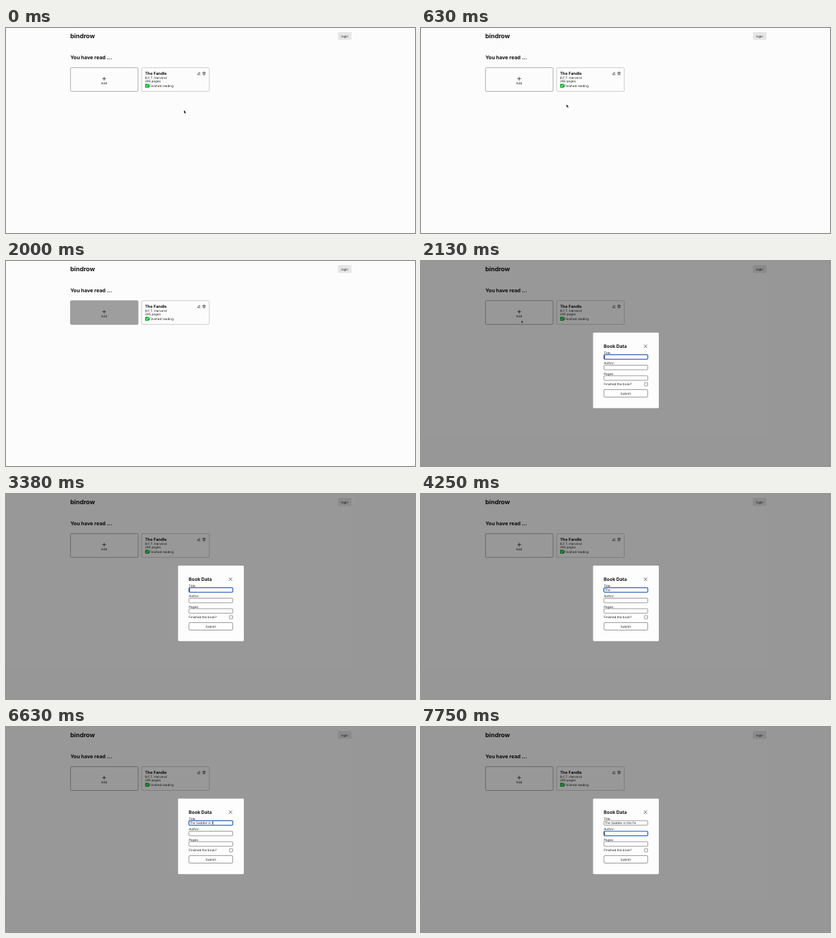
Recreate the animation shown at these times as an HTML page. Size 600 by 302 pixels, loop 8000 ms.

```html
<!DOCTYPE html>
<html lang="en">
<head>
<meta charset="utf-8">
<title>Book list</title>
<style>
  html, body { margin: 0; width: 100%; height: 100%; overflow: hidden; background: #fcfcfd; }
  svg { display: block; width: 100%; height: 100%; }
  text { font: 400 4.58px Inter, "Liberation Sans", sans-serif; fill: #1c1c1c; white-space: pre; text-rendering: geometricPrecision; }
  .b { font-weight: 700; fill: #111; }
  .mid { text-anchor: middle; }
  .line { fill: none; stroke: #222; stroke-width: .65; stroke-linecap: round; stroke-linejoin: round; }
  .field { fill: #fff; stroke: #555; stroke-width: .6; }
</style>
</head>
<body>
<svg viewBox="0 0 600 302" preserveAspectRatio="none">
  <rect width="600" height="302" fill="#fcfcfd"/>
  <text class="b" x="94.3" y="14.6" style="font-size:9.1px">bindrow</text>
  <rect x="486.9" y="6" width="19.9" height="11.6" rx="1.3" fill="#e6e6e7"/>
  <text class="mid" x="496.8" y="13.6">login</text>
  <text class="b" x="94.4" y="45.8" style="font-size:7.5px">You have read ...</text>

  <rect id="add" x="94.6" y="58.4" width="99.2" height="35" rx="1.5" stroke="#8c8c8c" stroke-width=".7"/>
  <path class="line" d="M144 72.3v4.8M141.6 74.7h4.8" style="stroke-width:.8"/>
  <text class="mid" x="144" y="83.3">Add</text>

  <rect x="199" y="58.4" width="99.2" height="35" rx="1.5" fill="#fcfcfd" stroke="#b9b9b9" stroke-width=".7"/>
  <text class="b" x="203.9" y="68.8" style="font-size:5.95px">The Fandle</text>
  <text x="203.9" y="74.5">B.F.T. Harvend</text>
  <text x="203.9" y="80.2">295 pages</text>
  <rect x="204" y="82.3" width="6" height="5.7" rx=".9" fill="#08b52c"/>
  <path class="line" d="M205.3 85.3l1.2 1.2 2.3-2.9" style="stroke:#fff;stroke-width:.9"/>
  <text x="210" y="86.8">Finished reading</text>
  <path class="line" d="M281.2 68.6l.3-1.3 2.1-2.2 1 1-2.1 2.2zM283.2 68.9h1.7"/>
  <path class="line" d="M288.4 65.7h4.2M289.7 65.5v-.7h1.6v.7M288.9 65.9l.3 3.2h2.6l.3-3.2M290.1 66.9v1.3M290.9 66.9v1.3" style="stroke-width:.5"/>

  <g id="modal">
    <rect width="600" height="302" fill="#000" fill-opacity=".4"/>
    <rect x="252.4" y="105.5" width="96.5" height="111.2" rx="1.4" fill="#fdfdfd"/>
    <text class="b" x="268.1" y="128.2" style="font-size:6.85px">Book Data</text>
    <path class="line" d="M327.3 123.5l4.1 4.1M331.4 123.5l-4.1 4.1"/>
    <g id="fields"></g>
    <text x="268.2" y="183.3">Finished the book?</text>
    <rect class="field" x="327.8" y="179.2" width="4.7" height="4.7" rx=".8"/>
    <rect class="field" x="268.3" y="189.5" width="64.3" height="11" rx="1.5"/>
    <text class="mid" x="300.4" y="196.7">Submit</text>
    <rect id="ring" x="268.3" width="64.4" height="6.7" rx="1.2" fill="none" stroke="#1c62cf" stroke-width="1.1"/>
    <text id="typed" x="269.4" y="143.1"></text>
    <rect id="caret" width=".65" height="5" fill="#111"/>
  </g>

  <path id="arrow" d="M0 0v4.7l1.1-1 .8 1.8.9-.4-.8-1.7h1.5z" fill="#111" stroke="#fff" stroke-width=".3"/>
  <path id="hand" d="M1 3.2V.7q.5-.7 1 0v1.5l1.9.5q.5.2.4.8l-.3 1.8H1.6L0 3.2q.3-.6 1 0z" fill="#fff" stroke="#111" stroke-width=".55" stroke-linejoin="round"/>
</svg>
<script>
const LOOP = 8000;
const TITLE = "The Saddler in the Fe";
const keyTimes = [3500, 3630, 3750, 3880, 4750, 4880, 5000, 5250, 5380, 5500, 5630,
  5880, 6000, 6250, 6380, 6630, 6750, 6880, 7000, 7130, 7250];

// [start, value...]: each row holds until the next one starts
const pointer = [
  [0, "arrow", 261, 121], [130, "arrow", 255, 119.3], [250, "arrow", 243, 116.5],
  [380, "arrow", 230, 114.3], [500, "arrow", 219, 113], [630, "arrow", 213.4, 112.4],
  [1250, "hand", 158, 88], [1380, "hand", 145.9, 87], [2000, ""],
  [2130, "arrow", 147.2, 87], [2380, "arrow", 205, 106], [2500, "arrow", 300, 129],
  [2630, "arrow", 344.5, 138], [3000, ""]
];
const addFill = [
  [0, "#fcfcfd"], [1250, "#f2f2f2"], [1380, "#e7e7e7"],
  [1880, "#c3c3c3"], [2000, "#9e9e9e"], [2130, "#fcfcfd"]
];

const $ = id => document.getElementById(id);
const set = (id, attrs) => {
  for (const name in attrs) $(id).setAttribute(name, attrs[name]);
};
const show = (id, on) => set(id, { visibility: on ? "visible" : "hidden" });
const at = (rows, t) => rows.filter(row => row[0] <= t).pop().slice(1);

$("fields").innerHTML = ["Title:", "Author:", "Pages:"].map((label, i) => {
  const y = 138 + i * 15.5;
  return `<rect class="field" x="268.3" y="${y}" width="64.4" height="6.7" rx="1.2"/>
    <text x="268.2" y="${y - 1.1}">${label}</text>`;
}).join("");

function draw(t) {
  set("add", { fill: at(addFill, t)[0] });

  const [shape, x, y] = at(pointer, t);
  for (const id of ["arrow", "hand"]) {
    show(id, id === shape);
    if (id === shape) set(id, { transform: `translate(${x} ${y})` });
  }

  $("modal").style.display = t >= 2130 ? "" : "none";
  if (t < 2130) return;

  const typed = $("typed");
  typed.textContent = TITLE.slice(0, keyTimes.filter(k => k <= t).length);
  const onAuthor = t >= 7630;
  const top = onAuthor ? 153.5 : 138;
  const width = onAuthor || !typed.textContent ? 0 : typed.getComputedTextLength();
  set("ring", { y: top });
  set("caret", { x: 269.3 + width, y: top + .9 });
  show("caret", t < 4250 || t >= 4500);
}

function tick() {
  draw(performance.now() % LOOP);
  requestAnimationFrame(tick);
}
tick();
</script>
</body>
</html>
```
